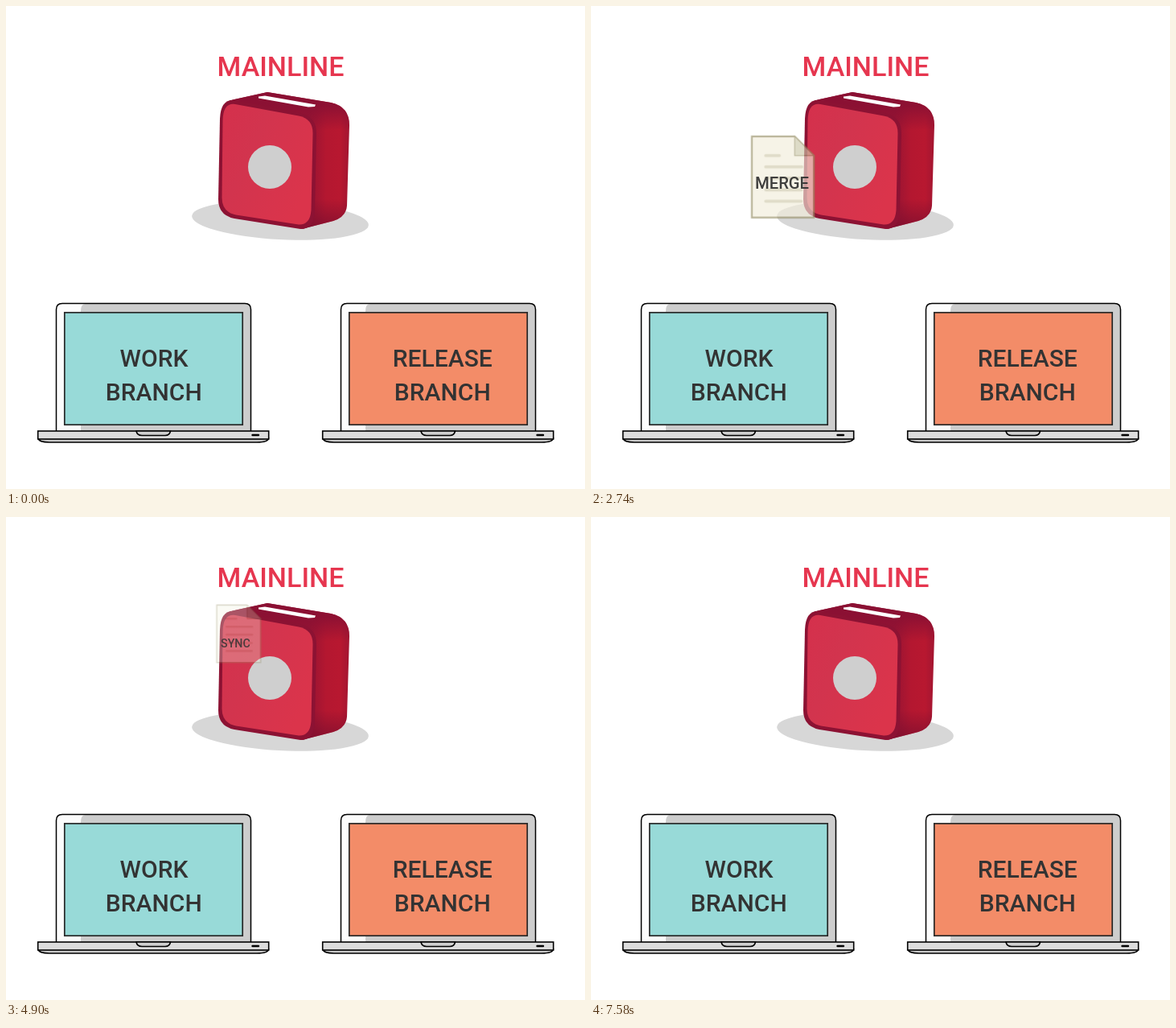
Animation, 720 px wide and 600 px high, one loop 8000 ms. Source, as an HTML page:

```html
<!DOCTYPE html>
<html lang="en">
<head>
<meta charset="utf-8">
<title>Merge and sync</title>
<style>
  html, body { margin: 0; width: 100%; height: 100%; overflow: hidden; background: #fff; }
  svg { display: block; width: 720px; height: 600px; }
  text { font-family: Roboto, Arial, sans-serif; font-weight: 500; text-anchor: middle; fill: #333; }
  .title { font-size: 34px; fill: #e6364f; }
  .label { font-size: 30px; }
  .tag { font-size: 28.5px; }
  .move { animation: 8s linear infinite; }
  .merge-page { animation-name: merge-page; }
  .merge-tag { animation-name: merge-tag; }
  .sync-page { animation-name: sync-page; }
  .sync-tag { animation-name: sync-tag; }

  @keyframes merge-page {
    0%, 6.25% { transform: translate(172px, 386px) scale(.333); opacity: 0; }
    18.25% { transform: translate(175px, 304px) scale(.667); opacity: .68; }
    25.25%, 28.24% { transform: translate(178.5px, 262px) scale(.9); opacity: 1; }
    28.25% { transform: translate(178px, 271px) scale(1); opacity: 1; }
    40.75% { transform: translate(304px, 149px) scale(.45); opacity: .26; }
    45.75%, 100% { transform: translate(351px, 112px) scale(.25); opacity: 0; }
  }
  @keyframes merge-tag {
    0%, 6.25% { transform: translate(172px, 388px) scale(.44); opacity: 0; }
    18.25% { transform: translate(176.5px, 309px) scale(.74); opacity: .95; }
    25.25%, 28.24% { transform: translate(180px, 266px) scale(.9); opacity: 1; }
    28.25% { transform: translate(181px, 272.5px) scale(1); opacity: 1; }
    40.75% { transform: translate(298.5px, 163px) scale(.4); opacity: .88; }
    45.75%, 100% { transform: translate(345px, 120px) scale(.2); opacity: 0; }
  }
  @keyframes sync-page {
    0%, 55.25% { transform: translate(351px, 108px) scale(.26); opacity: 0; }
    61.25% { transform: translate(289.5px, 145px) scale(.52); opacity: .3; }
    72.25%, 75.24% { transform: translate(177px, 222px) scale(1); opacity: 1; }
    75.25% { transform: translate(182px, 262px) scale(.94); opacity: 1; }
    78.75% { transform: translate(179px, 283px) scale(.81); opacity: .88; }
    85.75% { transform: translate(171.5px, 322px) scale(.55); opacity: .45; }
    94.75%, 100% { transform: translate(166px, 372px) scale(.25); opacity: 0; }
  }
  @keyframes sync-tag {
    0%, 55.25% { transform: translate(345px, 117px) scale(.25); opacity: 0; }
    61.25% { transform: translate(285.5px, 157px) scale(.5); opacity: .85; }
    72.25%, 75.24% { transform: translate(180px, 223px) scale(1.03); opacity: 1; }
    75.25% { transform: translate(181px, 260px) scale(1.05); opacity: 1; }
    78.75% { transform: translate(178.5px, 278px) scale(.98); opacity: 1; }
    85.75% { transform: translate(171.5px, 322px) scale(.8); opacity: .75; }
    94.75%, 100% { transform: translate(167px, 374px) scale(.6); opacity: 0; }
  }
</style>
</head>
<body>
<svg viewBox="0 0 720 600">
  <defs>
    <linearGradient id="front" x1="0" y1="0" x2="1" y2=".6">
      <stop offset="0" stop-color="#d5304c"/>
      <stop offset=".4" stop-color="#d2344e"/>
      <stop offset="1" stop-color="#db344b"/>
    </linearGradient>
    <linearGradient id="side" gradientUnits="userSpaceOnUse" x1="378" y1="0" x2="428" y2="0">
      <stop offset="0" stop-color="#981433"/>
      <stop offset=".4" stop-color="#b41730"/>
      <stop offset=".75" stop-color="#b81830"/>
      <stop offset="1" stop-color="#a01531"/>
    </linearGradient>
    <linearGradient id="shade" gradientUnits="userSpaceOnUse" x1="0" y1="107" x2="0" y2="277">
      <stop offset="0" stop-color="#8a1033"/>
      <stop offset=".1" stop-color="#8a1033" stop-opacity=".9"/>
      <stop offset=".28" stop-color="#8a1033" stop-opacity="0"/>
      <stop offset=".78" stop-color="#7a0e2e" stop-opacity="0"/>
      <stop offset="1" stop-color="#7a0e2e" stop-opacity=".8"/>
    </linearGradient>

    <g id="page">
      <path d="M-52.500-68.500H20L52.500-36V68.500H-52.500Z" stroke="#928a5f" stroke-width="3"/>
      <path d="M20-68.500V-36H52.500Z" fill="#cbc8a9" stroke="#928a5f" stroke-width="1.5"/>
      <path d="M-29-36H-6M-29-17H32M-29 2H32M-29 22H31M-29 41H31" fill="none"
            stroke="#cfc9ab" stroke-width="5" stroke-linecap="round"/>
    </g>

    <g id="lid">
      <path d="M62.500 528V377Q62.500 369.500 70 369.500H297Q304.500 369.500 304.500 377V528Z" fill="#fcfcfc"/>
      <path d="M93 528V379Q93 370 99 370H297Q304 370 304 377V528Z" fill="#cdcdcd"/>
      <path d="M62.500 528V377Q62.500 369.500 70 369.500H297Q304.500 369.500 304.500 377V528" fill="none" stroke="#000" stroke-width="1.5"/>
    </g>
    <rect id="screen" x="72.800" y="380.800" width="221.400" height="139.400" stroke="#262626" stroke-width="1.7"/>
    <g id="foot" stroke="#000" stroke-width="1.6">
      <path d="M40 537Q41 542 54 542H312Q326 542 326.500 537Z" fill="#c8c8c8"/>
      <rect x="39.700" y="528" width="287" height="10" fill="#dcdcdc"/>
      <path d="M162 528Q163 533.500 169 533.500H198Q203.500 533.500 204.500 528Z" fill="#cfcfcf"/>
      <path d="M306.500 533H314" stroke-width="2.4" stroke-linecap="round"/>
    </g>
    <path id="shell" d="M270 124Q274 118 284 116L325 107L404 120Q427 125 427 148L424 248Q423 262 407 267L368 277L330 260L300 130Z"/>
  </defs>

  <rect width="720" height="600" fill="#fff"/>
  <text class="title" x="341.500" y="87">MAINLINE</text>

  <ellipse cx="341" cy="266.500" rx="110" ry="23.500" fill="#d7d7d7" transform="rotate(3 341 266.500)"/>

  <g id="box">
    <use href="#shell" fill="url(#side)"/>
    <use href="#shell" fill="url(#shade)"/>
    <path d="M314 112.500L322 111.500L385 122.500L384 125L376 125.500L314 114.500Z" fill="#fff"/>
    <path d="M266 140Q267 115 285 117L365 132.500Q386 137 386 158L384 255Q383 277 366 277L284 264Q264 260 264 240Z" fill="#8c1233"/>
    <path d="M269.500 142Q270 120 285 122L364 136.500Q381.500 140 381.500 158L379.500 253Q378.500 272 364 271.500L286 259.500Q268.500 256 268.500 238Z" fill="url(#front)"/>
    <circle cx="328" cy="200" r="27" fill="#cfcfcf"/>
  </g>

  <g class="move merge-page" fill="#f2edda"><use href="#page"/></g>
  <g class="move merge-tag"><text class="tag" y="10">MERGE</text></g>
  <g class="move sync-page" fill="#f0f0dc"><use href="#page"/></g>
  <g class="move sync-tag"><text class="tag" y="10">SYNC</text></g>

  <g>
    <use href="#lid"/>
    <use href="#screen" fill="#98dad8"/>
    <use href="#foot"/>
    <text class="label" x="184" y="448">WORK</text>
    <text class="label" x="183.800" y="490">BRANCH</text>
  </g>
  <g transform="translate(354)">
    <use href="#lid"/>
    <use href="#screen" fill="#f38c68"/>
    <use href="#foot"/>
    <text class="label" x="188.800" y="448">RELEASE</text>
    <text class="label" x="188.800" y="490">BRANCH</text>
  </g>
</svg>
</body>
</html>
```
